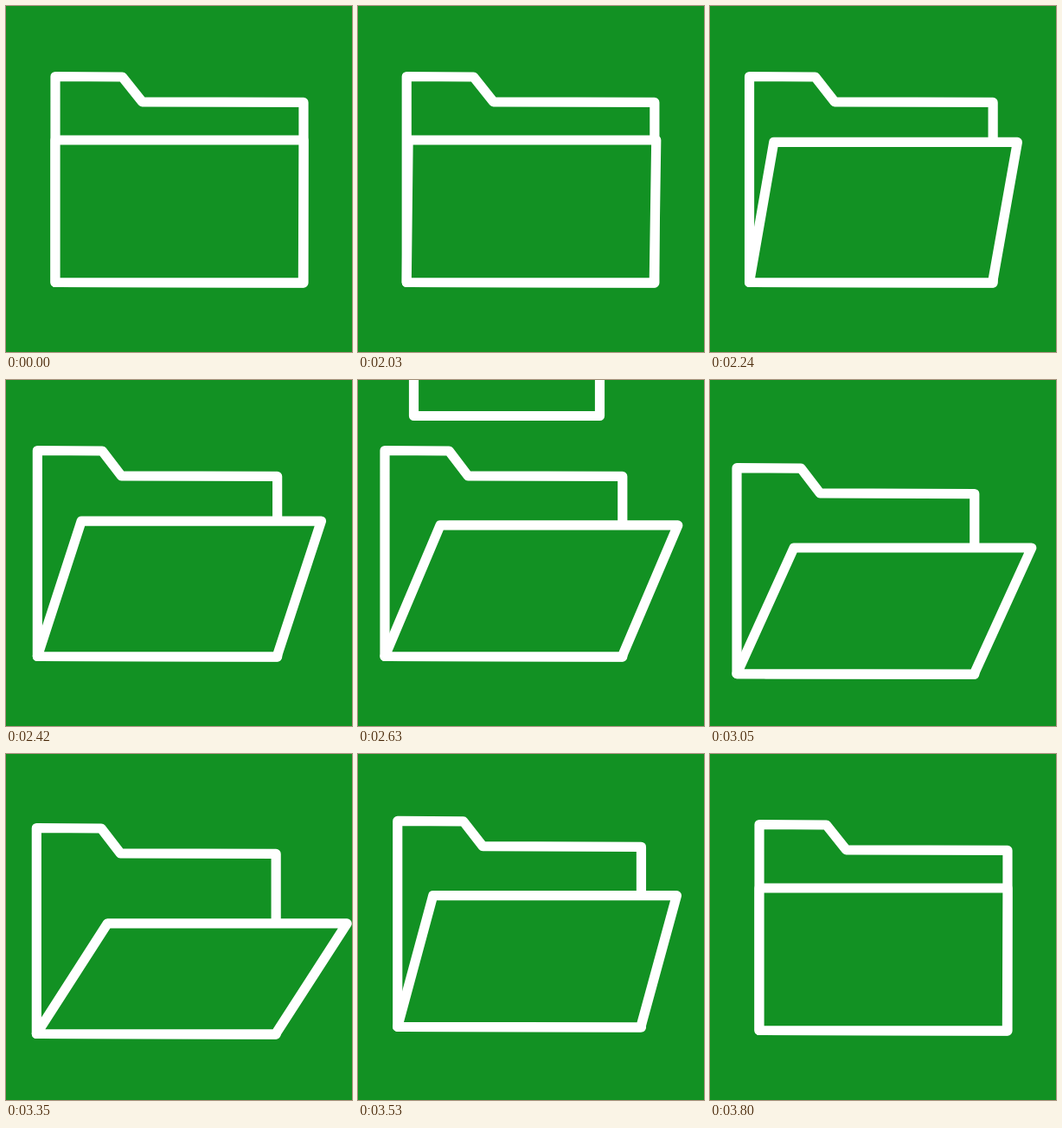
An HTML page that plays this animation: 400x400 px, repeating every 3.83 s.

```html
<!DOCTYPE html>
<html lang="en">
<head>
<meta charset="utf-8">
<title>Folder</title>
<style>
  html, body { margin: 0; height: 100%; overflow: hidden; background: #129123; }
  svg { display: block; width: 100vw; height: 100vh; }
  path { fill: #129123; stroke: #fff; stroke-width: 11.2; stroke-linejoin: round; }
</style>
</head>
<body>
<svg viewBox="0 0 400 400">
  <path id="back"/>
  <path id="paper"/>
  <path id="front"/>
</svg>
<script>
const LOOP = 3830, STEP = 30, START = 2030;
const PANEL = 164.5, SHEET = 300, FALL = 1.3;

const [back, paper, front] = ['back', 'paper', 'front'].map(id => document.getElementById(id));

// Linear rise from 0 to 1 between two times.
const ramp = (t, from, to) => Math.min(1, Math.max(0, (t - from) / (to - from)));

function outline(path, ...points) {
  path.setAttribute('d', 'M' + points.join('L') + 'Z');
}

function draw(t) {
  const opening = ramp(t, 2015, 2525);
  const open = opening - ramp(t, 3275, 3725);
  const push = ramp(t, 2900, 3350);
  const release = 1 - ramp(t, 3350, 3710);

  // The folder dips under the sheet, rebounds and settles.
  const dy = 24.2 * ramp(t, 2900, 3080) - 29.2 * ramp(t, 3080, 3470) + 5 * ramp(t, 3470, 3800);

  const x = 57 - 26 * open, w = 287 - 12.2 * open, right = x + w;
  const base = 319.5 + dy;
  outline(back,
    [x, 81.5 + dy], [x + w * 0.27, 82 + dy], [x + w * 0.35, 110.8 + dy],
    [right, 111.4 + dy], [right, base + 0.6], [x, base]);

  // The sheet falls in from above and sinks behind the front.
  const top = Math.min(14.5 + FALL * (t - 2840), base);
  const foot = Math.min(top + SHEET, base);
  outline(paper, [64.5, top], [279.5, top], [279.5, foot], [64.5, foot]);

  // The front panel swings out, and the landing sheet presses it further.
  const lean = (64 * opening + 18 * push ** 2) * release;
  const lid = base - Math.sqrt(PANEL ** 2 - lean ** 2) + 15 * push * release;
  outline(front, [x + lean, lid], [right + lean, lid], [right - 0.6, base + 0.4], [x, base]);
}

function frame(now) {
  const t = now % LOOP;
  draw(START + Math.floor((t - START) / STEP) * STEP);
  requestAnimationFrame(frame);
}
draw(0);
requestAnimationFrame(frame);
</script>
</body>
</html>
```
